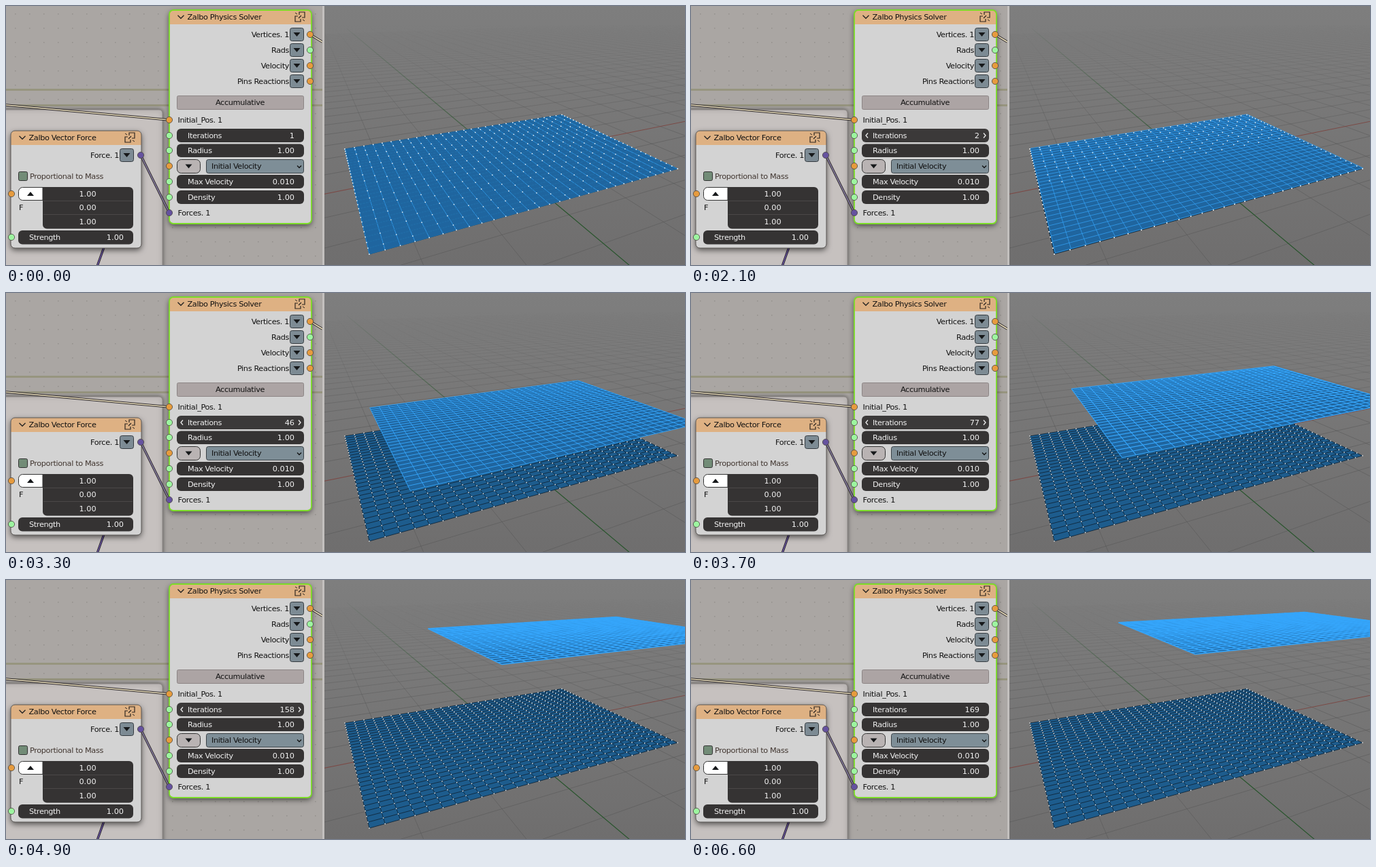
These frames come from a looping animation (998 by 382 pixels, 7400 ms). An HTML page with a canvas:

```html
<!DOCTYPE html>
<html lang="en">
<head>
<meta charset="utf-8">
<title>Physics solver nodes</title>
<style>
html, body { margin: 0; width: 100%; height: 100%; overflow: hidden; background: #777; }
canvas { display: block; }
</style>
</head>
<body>
<canvas id="stage" width="998" height="382"></canvas>
<script>
const ctx = document.getElementById('stage').getContext('2d');
const LOOP = 7400, CELLS = 29;
const DARK = '#353333', ORANGE = '#e69b3e', GREEN = '#9df5a0', PURPLE = '#65529f';
// [time, iterations] while the field is dragged
const DRAG = [[2000, 1], [2100, 2], [2600, 14], [2800, 20], [3300, 46], [3600, 70],
  [4200, 112], [4400, 126], [4900, 158], [5200, 167], [5300, 169]];

function iterationsAt(t) {
  if (t <= 2000) return 1;
  const i = DRAG.findIndex(p => p[0] >= t);
  if (i < 0) return 169;
  const [t0, a] = DRAG[i - 1], [t1, b] = DRAG[i];
  return Math.round(a + (b - a) * (t - t0) / (t1 - t0));
}

// Perspective of the floor plane, pushed n steps along the force
function project(u, v, n = 0) {
  const w = 1 + .3015 * u - .409 * v + .00042 * n;
  return [(498 + 565.3 * u - 182.4 * v + 1.036 * n) / w, (211 - 2.1 * u + 5.3 * v - .851 * n) / w];
}

function path(points, closed) {
  ctx.beginPath();
  points.forEach(p => ctx.lineTo(...p));
  if (closed) ctx.closePath();
}

function line(points, color, width = 1) {
  path(points);
  ctx.strokeStyle = color;
  ctx.lineWidth = width;
  ctx.stroke();
}

function shape(points, color) {
  path(points, true);
  ctx.fillStyle = color;
  ctx.fill();
}

function box(x, y, x2, y2, r, fill, stroke, width = 1) {
  ctx.beginPath();
  ctx.roundRect(x, y, x2 - x, y2 - y, r);
  ctx.fillStyle = fill;
  ctx.fill();
  if (stroke) {
    ctx.strokeStyle = stroke;
    ctx.lineWidth = width;
    ctx.stroke();
  }
}

function text(str, x, y, color = '#111', align = 'left') {
  ctx.font = '11.3px "DejaVu Sans", sans-serif';
  ctx.letterSpacing = /^[\d.]+$/.test(str) ? '0px' : '-0.37px';
  ctx.textAlign = align;
  ctx.fillStyle = color;
  ctx.fillText(str, x, y);
}

function socket(x, y, color) {
  ctx.beginPath();
  ctx.arc(x, y, 4.6, 0, 7);
  ctx.fillStyle = color;
  ctx.fill();
  ctx.strokeStyle = '#4a443f';
  ctx.lineWidth = .8;
  ctx.stroke();
}

function triangle(x, y, dir = 1) {
  shape([[x - 5, y - 3 * dir], [x + 5, y - 3 * dir], [x, y + 3 * dir]], '#16181a');
}

function chevron(x, y, s, color) {
  line([[x - s, y - s / 2], [x, y + s / 2], [x + s, y - s / 2]], color, 1.3);
}

function wire(x, y, x2, y2, color) {
  line([[x, y], [x2, y2]], '#2b2628', 3.4);
  line([[x, y], [x2, y2]], color, 1.6);
}

function field(x, y, x2, y2, label, value, fill = DARK) {
  box(x, y, x2, y2, 6, fill);
  const base = (y + y2) / 2 + 4;
  text(label, x + 16, base, '#f2f2f2');
  text(value, x2 - 14, base, '#f2f2f2', 'right');
}

function node(x, y, x2, y2, title, border, width) {
  ctx.save();
  ctx.shadowColor = 'rgba(0,0,0,.6)';
  ctx.shadowBlur = 9;
  ctx.shadowOffsetY = 3;
  box(x, y, x2, y2, 6, '#d3d3d3');
  ctx.restore();
  box(x, y, x2, y + 21, [6, 6, 0, 0], '#deb183');
  ctx.beginPath();
  ctx.roundRect(x, y, x2 - x, y2 - y, 6);
  ctx.strokeStyle = border;
  ctx.lineWidth = width;
  ctx.stroke();
  const cy = y + 10, ix = x2 - 17;
  chevron(x + 17, cy, 4.5, '#222');
  text(title, x + 26.5, cy + 4);
  // linked-squares icon
  const ink = '#2e2620';
  line([[ix - 1, cy - 3], [ix - 1, cy - 7], [ix + 7, cy - 7], [ix + 7, cy + 1], [ix + 3, cy + 1]], ink, 1.2);
  line([[ix - 3, cy - 1], [ix - 7, cy - 1], [ix - 7, cy + 7], [ix + 1, cy + 7], [ix + 1, cy + 3]], ink, 1.2);
  line([[ix - 2, cy + 2], [ix + 2, cy - 2]], ink, 1.2);
  line([[ix - 7, cy - 6], [ix - 4, cy - 4]], ink);
  line([[ix + 4, cy + 4], [ix + 7, cy + 6]], ink);
}

function output(label, x, y, color, side) {
  text(label, x - 1, y + 4, '#111', 'right');
  box(x + .5, y - 9.5, x + 20.5, y + 9.5, 3, '#7d8b94', '#353b40');
  triangle(x + 10.5, y);
  socket(side, y, color);
}

function editor(n, t) {
  box(0, 0, 468, 382, 0, '#aaa6a3');
  ctx.fillStyle = 'rgba(70,66,62,.22)';
  for (let x = 13; x < 465; x += 21)
    for (let y = 11; y < 382; y += 21) ctx.fillRect(x, y, 1.5, 1.5);
  for (const y of [123.5, 146.5]) line([[0, y], [465, y]], '#97957f', 3);

  ctx.save();
  ctx.shadowColor = 'rgba(0,0,0,.5)';
  ctx.shadowBlur = 6;
  box(-9, 153, 230, 400, 5, '#c6c1bf', '#8d8886');
  ctx.restore();

  wire(0, 146, 240, 168, '#eadfbd');
  wire(447, 42, 465, 53, '#eadfbd');
  wire(145, 353, 134, 384, PURPLE);

  node(7, 184, 199, 357, 'Zalbo Vector Force', '#5b5754', 1);
  node(240, 6, 449, 321, 'Zalbo Physics Solver', '#7bdc27', 1.8);
  wire(198, 220, 240, 305, '#8a80a6');

  output('Force. 1', 167, 220, PURPLE, 198);
  box(18.5, 244.5, 31.5, 257.5, 2, '#728c77', '#333');
  text('Proportional to Mass', 35, 255, '#40352f');
  box(54, 267, 187, 328.5, [0, 6, 6, 6], DARK);
  box(18.5, 267.5, 54, 286.5, [6, 0, 0, 6], '#fff', '#333');
  triangle(36, 277, -1);
  for (const y of [287.5, 307.5]) line([[55, y], [186, y]], '#4b4848');
  ['1.00', '0.00', '1.00'].forEach((s, i) => text(s, 120, 281 + i * 20.4, '#f2f2f2', 'center'));
  text('F', 19, 301);
  field(18, 331, 187, 351.5, 'Strength', '1.00');
  socket(8, 277, ORANGE);
  socket(8, 341, GREEN);

  output('Vertices. 1', 417, 42, ORANGE, 447);
  output('Rads', 417, 65, GREEN, 447);
  output('Velocity', 417, 88, ORANGE, 447);
  output('Pins Reactions', 417, 111, ORANGE, 447);
  box(251.5, 132.5, 437.5, 152.5, 2, '#aca4a4', '#8c8585');
  text('Accumulative', 344, 146, '#111', 'center');
  text('Initial_Pos. 1', 252.5, 172);

  const hover = t >= 1000 && t < 6000, pressed = t >= 1700 && t < 5700;
  field(251, 181, 438, 201, 'Iterations', String(n), pressed ? '#3b3939' : hover ? '#444242' : DARK);
  if (hover) {
    line([[260, 187.5], [257, 191], [260, 194.5]], '#eee', 1.3);
    line([[430, 187.5], [433, 191], [430, 194.5]], '#eee', 1.3);
  }
  field(251, 203.5, 438, 223, 'Radius', '1.00');
  box(251.5, 226.5, 285.5, 246.5, 6, '#b9b3b3', '#333');
  triangle(268.5, 236.5);
  box(294.5, 226.5, 437.5, 246.5, 3, '#7e8e97', '#3a4146');
  text('Initial Velocity', 302, 240);
  chevron(431, 237, 3, '#111');
  field(251, 249, 438, 269, 'Max Velocity', '0.010');
  field(251, 272, 438, 292, 'Density', '1.00');
  text('Forces. 1', 252.5, 309);
  [[168, ORANGE], [191, GREEN], [213, GREEN], [236, ORANGE], [259, GREEN], [282, GREEN], [305, PURPLE]]
    .forEach(([y, c]) => socket(240, y, c));

  box(465, 0, 468, 382, 0, '#c3c0be');
}

function fade(from, to, rgb, alpha) {
  const g = ctx.createLinearGradient(0, from, 0, to);
  g.addColorStop(0, `rgba(${rgb},0)`);
  g.addColorStop(1, `rgba(${rgb},${alpha})`);
  return g;
}

function floor() {
  const back = ctx.createLinearGradient(0, 0, 0, 382);
  back.addColorStop(0, '#7e7e7e');
  back.addColorStop(1, '#6f6e6e');
  box(468, 0, 998, 382, 0, back);
  const faint = fade(25, 200, '80,80,80', .45);
  const along = v => [project((.409 * v - .85) / .3015, v), project(12, v)];
  const across = u => [project(u, -9), project(u, (.85 + .3015 * u) / .409)];
  for (let k = -40; k <= 40; k++) {
    const s = .5 + k * .2;
    if (k) {
      line(along(s), faint);
      line(across(s), faint);
    }
  }
  line(along(.5), '#7b4a46', 1.1);
  line(across(.5), fade(20, 260, '40,84,44', 1), 1.2);
}

const row = (s, n) => [project(0, s, n), project(1, s, n)];
const column = (s, n) => [project(s, 0, n), project(s, 1, n)];

function grid(n, fill, color, width) {
  shape([...row(0, n), ...row(1, n).reverse()], fill);
  for (let i = 0; i <= CELLS; i++) {
    line(column(i / CELLS, n), color, width);
    line(row(i / CELLS, n), color, width);
  }
}

function dots(shown) {
  ctx.fillStyle = '#fff';
  for (let i = 0; i <= CELLS; i++)
    for (let j = 0; j <= CELLS; j++) {
      if (!shown(i, j)) continue;
      const [x, y] = project(i / CELLS, j / CELLS);
      ctx.fillRect(x - .7, y - .7, 1.4, 1.4);
    }
}

// Where both surfaces nearly touch, parts of the lower one show through
function showThrough(n) {
  if (n === 1)
    for (let i = 0; i <= CELLS; i++) line(row(i / CELLS), 'rgba(12,40,66,.5)', .8);
  const edge = k => k === 0 || k === CELLS;
  const reach = n === 1 ? CELLS : CELLS / 2;
  dots((i, j) => edge(i) || edge(j) || (j < reach && (i * 7 + j * 3) % 5 < 2));
}

function draw(t) {
  const n = iterationsAt(t), shift = (n - 1) * 169 / 168;
  floor();
  grid(0, '#1d5c8d', '#10283b', .9);
  dots(() => true);
  grid(shift, '#1f659f', '#35a5fa', .7 + n / 200);
  if (n < 3) showThrough(n);
  editor(n, t);
}

let last = -1;
function tick(now) {
  const t = Math.floor(now % LOOP / 100) * 100;
  if (t !== last) draw(last = t);
  requestAnimationFrame(tick);
}
draw(0);
requestAnimationFrame(tick);
</script>
</body>
</html>
```
